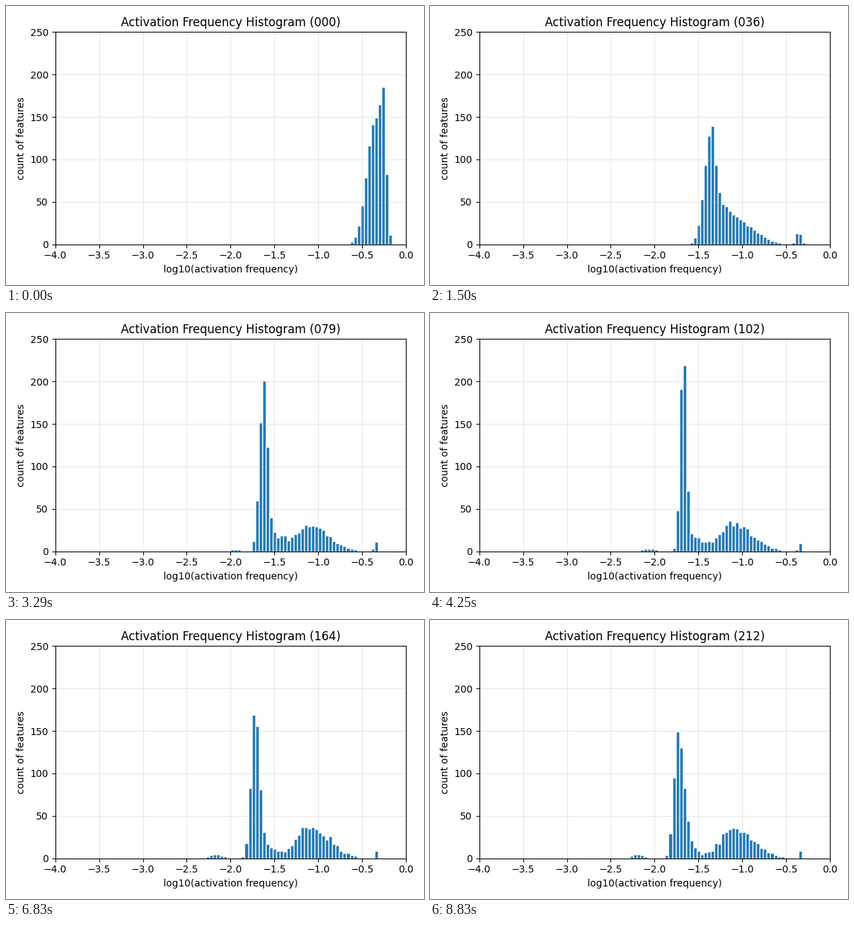
A matplotlib script for the animation above (8870 ms loop, 600 px wide and 400 px high).

```python
import numpy as np
import matplotlib.pyplot as plt
from matplotlib.animation import FuncAnimation

STEPS = 213
LOOP_MS = 8870
WIDTH = 0.04
X = np.arange(-2.38, -0.1, WIDTH)  # bin centres

# Shape of the main peak at a few moments, eased in log time
KEYS = [0, 16, 57, 102, 139, 212]
HEIGHT = [143, 112, 148, 240, 195, 148]
LEFT = [0.033, 0.10, 0.066, 0.036, 0.042, 0.046]
RIGHT = [0.034, 0.045, 0.05, 0.034, 0.04, 0.064]

# Slowly drifting unevenness of the bins
DRIFT = 40
noise = np.random.default_rng(4).normal(size=(STEPS // DRIFT + 2, X.size))


def log_time(step):
    return np.log(np.asarray(step) + 6)


def ease(step, values):
    return np.interp(log_time(step), log_time(KEYS), values)


def hump(center, height, left, right):
    """Gaussian with its own width on each side."""
    d = X - center
    return height * np.exp(-0.5 * (d / np.where(d < 0, left, right)) ** 2)


def wobble(step):
    row, part = divmod(step, DRIFT)
    s = part / DRIFT
    return (1 - s) * noise[row] + s * noise[row + 1]


def histogram(step):
    p = np.exp(-0.0733 * step ** 0.81)  # falls from 1 to 0 during training
    q = 1 - p
    peak = -1.742 + 1.482 * p
    main = hump(peak, ease(step, HEIGHT), ease(step, LEFT), ease(step, RIGHT))
    shoulder = hump(peak + 0.13 - 0.225 * p ** 4, 14 + 132 * p ** 1.1,
                    0.06 + 0.035 * p ** 4, 0.1 + 0.1 * p - 0.14 * p ** 4)
    dense = hump(-1.12 + 2 * p ** 2, 37 * q ** 2, 0.01 + 0.13 * q, 0.01 + 0.23 * q)
    rare = hump(-2.2 + 3.2 * p, 5.5 * q ** 10, 0.07, 0.07)
    constant = hump(-0.34 - 0.08 * p, (9 + 27 * p) * (1 - p ** 8),
                    0.015 + 0.05 * p, 0.015 + 0.05 * p)
    tail = shoulder + dense
    tail = tail + 0.5 * q * np.sqrt(tail) * wobble(step)
    return np.round(np.clip(main + tail + rare + constant, 0, None))


fig, ax = plt.subplots(figsize=(6, 4), dpi=100)
bars = ax.bar(X, histogram(0), width=WIDTH, color="C0", edgecolor="white")
ax.set_xlim(-4, 0)
ax.set_ylim(0, 250)
ax.set_xlabel("log10(activation frequency)")
ax.set_ylabel("count of features")
ax.grid(alpha=0.3)
title = ax.set_title("Activation Frequency Histogram (000)")
fig.tight_layout()


def update(step):
    for bar, height in zip(bars, histogram(step)):
        bar.set_height(height)
        bar.set_visible(height > 0)
    title.set_text(f"Activation Frequency Histogram ({step:03d})")
    return [*bars, title]


anim = FuncAnimation(fig, update, frames=STEPS, interval=LOOP_MS / STEPS,
                     repeat=True, repeat_delay=0)
plt.show()
```
